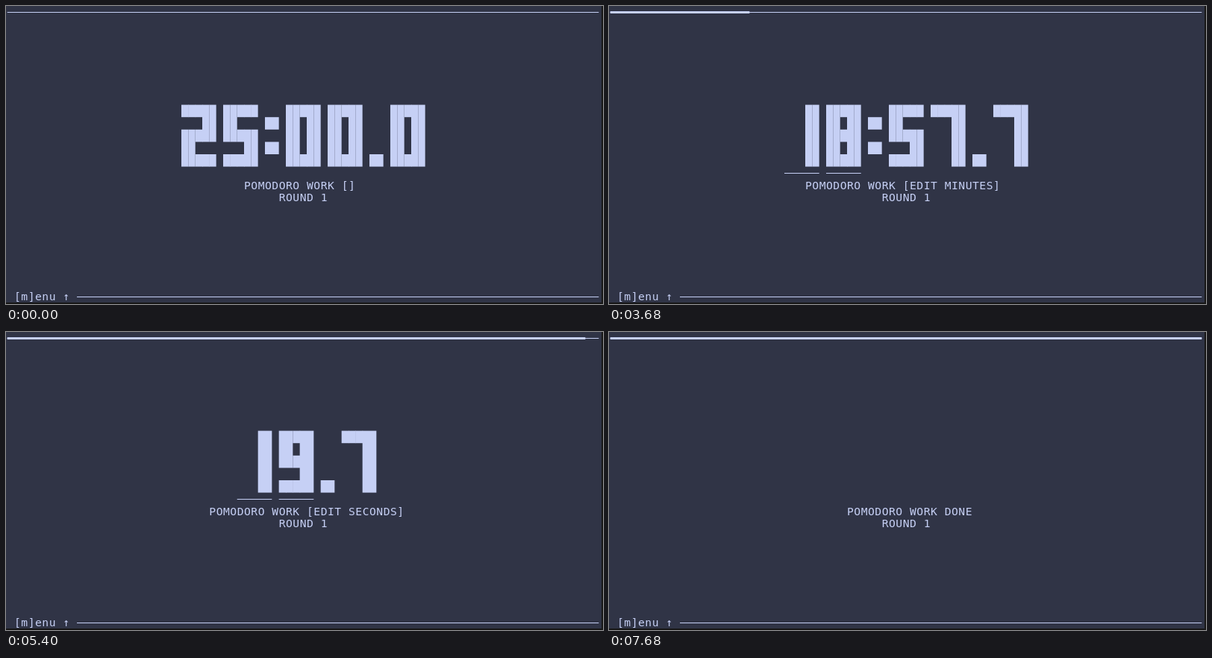
Write an HTML page with a canvas that moves like this. It is 800 px wide and 400 px high and loops after 8000 ms.

```html
<!DOCTYPE html>
<html>
<head>
<meta charset="utf-8">
<style>
html, body { margin: 0; width: 100%; height: 100%; overflow: hidden; background: #303446; }
canvas { display: block; }
</style>
</head>
<body>
<canvas id="stage" width="800" height="400"></canvas>
<script>
const ctx = document.getElementById('stage').getContext('2d');
const BG = '#303446', FG = '#c6d0f5', EDGE = '#171717';
const LOOP = 8000, TICK = 40, COLS = 85, TOTAL = 15000; // TOTAL in tenths of a second

// Terminal grid
const colX = c => 1.67 + c * 28 / 3;
const rowY = r => r * 16.6 - 0.2;
const LINE_END = 794.3;

// Each digit is five rows, each row one of four five-bit patterns
const PATTERNS = [0b11111, 0b11011, 0b00011, 0b11000];
const DIGITS = ['01110', '22222', '02030', '02020', '11022',
                '03020', '03010', '02222', '01010', '01020'];
const glyphWidth = ch => /\d/.test(ch) ? 5 : 2;

// Key presses while editing: [time, presses so far]
const PRESSES = [[3488, 0], [4200, 23], [4320, 29], [5400, 62], [5960, 80]];

function presses(t) {
  if (t <= PRESSES[0][0]) return 0;
  for (let i = 1; i < PRESSES.length; i++) {
    const [t0, n0] = PRESSES[i - 1], [t1, n1] = PRESSES[i];
    if (t <= t1) return Math.floor(n0 + (t - t0) * (n1 - n0) / (t1 - t0));
  }
  return 80;
}

const countdown = (t, start) => Math.max(0, Math.floor((t - start) / 98));

// Remaining tenths, status label and the unit being edited
function stateAt(t) {
  if (t < 960) return { left: TOTAL, status: '[]' };
  if (t < 3280) return { left: TOTAL - countdown(t, 919), status: '>' };
  if (t < 6080) {
    const n = presses(t);
    const minutes = Math.max(0, 24 - n), seconds = 57 - Math.max(0, n - 24);
    const edit = minutes ? 'MINUTES' : 'SECONDS';
    return { left: minutes * 600 + seconds * 10 + 7, status: `[EDIT ${edit}]`, edit };
  }
  const left = Math.max(0, 17 - countdown(t, 5987));
  return { left, status: left ? '>' : 'DONE' };
}

function clockText(left) {
  if (!left) return '';
  const m = Math.floor(left / 600), s = Math.floor(left / 10) % 60;
  return (m ? m + ':' + String(s).padStart(2, '0') : s) + '.' + left % 10;
}

function cells(c, r, count) {
  ctx.fillRect(colX(c), rowY(r), count * 28 / 3, 16.6);
}

function text(str, c, r) {
  [...str].forEach((ch, i) => ctx.fillText(ch, colX(c + i), rowY(r) + 13.6));
}

function glyph(ch, c) {
  if (ch === '.') return cells(c, 12, 2);
  if (ch === ':') {
    cells(c, 9, 2);
    return cells(c, 11, 2);
  }
  // Merge equal neighbouring rows so that no seams show
  for (let col = 0; col < 5; col++) {
    let from = -1;
    for (let row = 0; row <= 5; row++) {
      const on = row < 5 && PATTERNS[DIGITS[ch][row]] >> (4 - col) & 1;
      if (on && from < 0) from = row;
      if (!on && from >= 0) {
        const x = colX(c + col), next = col < 4 && PATTERNS[DIGITS[ch][from]] >> (3 - col) & 1;
        ctx.fillRect(x, rowY(8 + from), 28 / 3 + (next && row - from === 1 ? 0.5 : 0), (row - from) * 16.6);
        from = -1;
      }
    }
  }
}

function draw(t) {
  const { left, status, edit } = stateAt(t);
  const clock = clockText(left), label = 'POMODORO WORK ' + status;

  ctx.fillStyle = EDGE;
  ctx.fillRect(0, 0, 800, 400);
  ctx.fillStyle = BG;
  ctx.fillRect(0, 0, 798, 398);
  ctx.fillStyle = FG;
  ctx.font = '14.667px "DejaVu Sans Mono", monospace';

  // Progress bar
  const done = Math.floor(COLS * (TOTAL - left) / TOTAL);
  ctx.fillRect(colX(0), 8, LINE_END - colX(0), 1);
  if (done) ctx.fillRect(colX(0), 7, Math.min(colX(done), LINE_END) - colX(0), 3);

  // Clock and label, centred together
  const clockWidth = [...clock].reduce((w, ch) => w + glyphWidth(ch) + 1, -1);
  const width = Math.max(clockWidth, label.length);
  const x = Math.ceil((COLS - width) / 2);
  let c = x + Math.ceil((width - clockWidth) / 2);
  let unit = clock.includes(':') ? 'MINUTES' : 'SECONDS';
  for (const ch of clock) {
    if (ch === ':') unit = 'SECONDS';
    if (ch === '.') unit = 'TENTHS';
    glyph(ch, c);
    if (unit === edit && ch !== ':') ctx.fillRect(colX(c), 224, 5 * 28 / 3, 1);
    c += glyphWidth(ch) + 1;
  }
  text(label, x + Math.floor((width - label.length) / 2), 14);
  text('ROUND 1', 39, 15);

  // Footer
  text('[m]enu ↑', 1, 23);
  ctx.fillRect(colX(10), 390, LINE_END - colX(10), 1);
}

const begin = performance.now();
function loop() {
  const t = (performance.now() - begin) % LOOP;
  draw(Math.floor(t / TICK) * TICK);
  requestAnimationFrame(loop);
}
loop();
</script>
</body>
</html>
```
